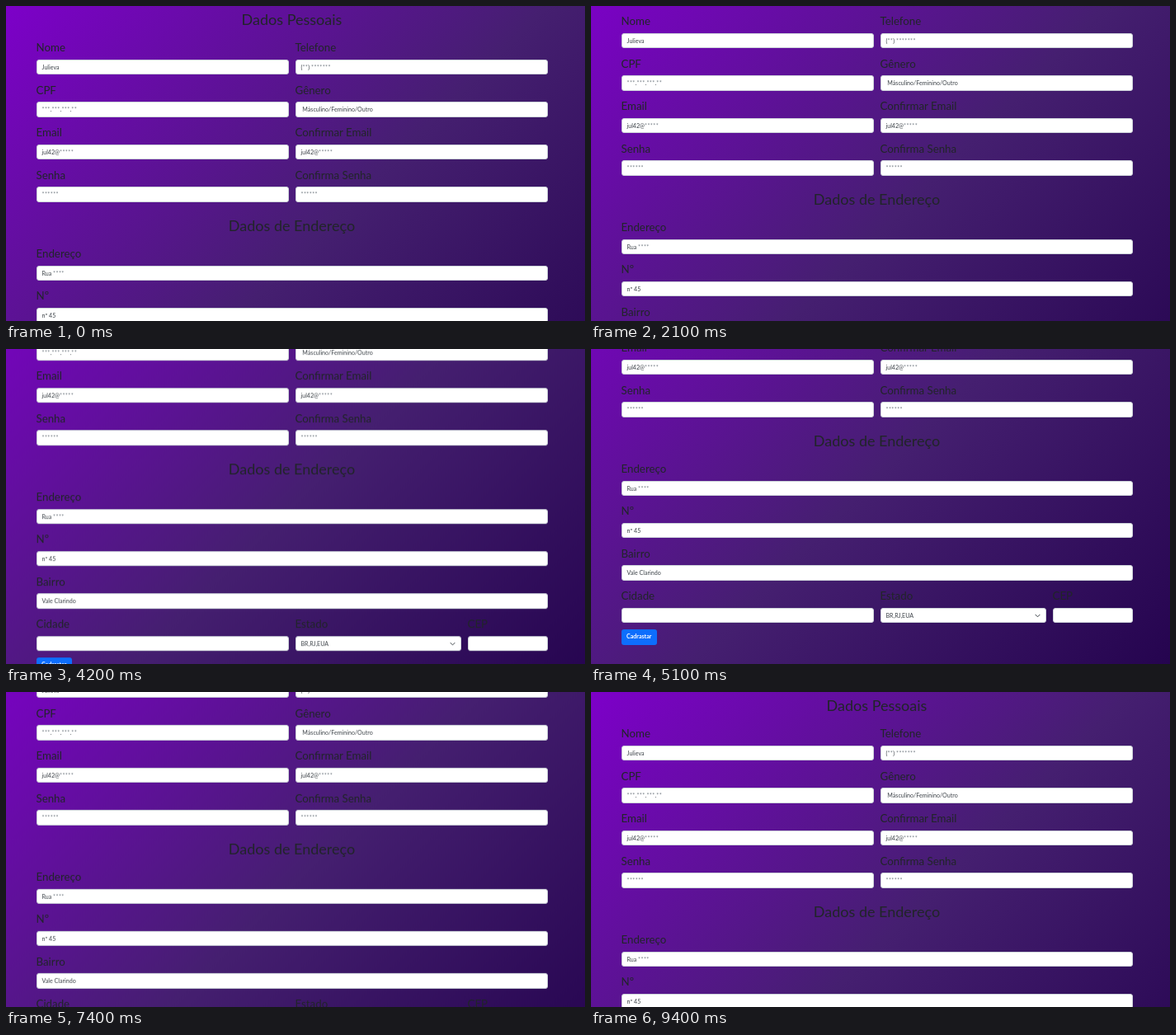
These frames come from a looping animation (702 by 382 pixels, 10 s). An HTML page:

```html
<!DOCTYPE html>
<html lang="pt-BR">
<head>
<meta charset="utf-8">
<title>Cadastro</title>
<style>
  html, body { margin: 0; width: 100%; height: 100%; overflow: hidden; background: #25044f; }
  body { position: relative; font-family: Lato, "Open Sans", sans-serif; color: #212529; }
  #page {
    position: absolute; left: 0; top: 0; width: 702px; height: 537px;
    background: linear-gradient(135deg, #7d00c9 0%, #451f70 53%, #25044f 100%);
    will-change: transform;
  }
  #page > * { position: absolute; box-sizing: border-box; margin: 0; white-space: pre; }
  h1 { left: 0; width: 693px; height: 26px; text-align: center; font: 400 18px/26px Lato, "Open Sans", sans-serif; }
  label { height: 18px; font-size: 13.3px; line-height: 18px; }
  .field {
    height: 18.6px; padding-left: 6px; border: .5px solid #ced4da; border-radius: 3px;
    background: #fff; color: #3c4248; font-size: 7.1px; line-height: 17.6px;
  }
  .field i { font-style: normal; letter-spacing: .4px; color: #6c757d; }
  .field svg { position: absolute; right: 6px; top: 5.5px; width: 7px; height: 7px; }
  .button {
    left: 36.5px; top: 495px; width: 43.5px; height: 18.6px; border-radius: 3px;
    background: #0d6efd; color: #fff; text-align: center; font-size: 7.1px; font-weight: 700; line-height: 18.6px;
  }
</style>
</head>
<body>
<div id="page"></div>
<script>
const page = document.getElementById('page');
const LEFT = 36.5, RIGHT = 350.5, HALF = 306, FULL = 620;
const LOOP = 10000, STEP = 100, BOTTOM = 155;

function add(tag, html, style, cls = '') {
  const el = document.createElement(tag);
  el.className = cls;
  el.innerHTML = html;
  for (const k in style) el.style[k] = style[k] + 'px';
  page.append(el);
}

const title = (text, y) => add('h1', text, { top: y - 13 });

// y is the vertical centre of the input
function field(name, value, x, y, width, extra = '') {
  const text = value.replace(/\*+/g, '<i>$&</i>');
  add('label', name, { left: x, top: y - 32.8 });
  add('div', text + extra, { left: x, top: y - 9.3, width }, 'field');
}

const chevron = '<svg viewBox="0 0 16 16"><path d="M2 5l6 6 6-6" fill="none" stroke="#343a40" ' +
  'stroke-width="2.2" stroke-linecap="round" stroke-linejoin="round"/></svg>';

title('Dados Pessoais', 16);
[
  ['Nome', 'Julieva', 'Telefone', '(**) *******'],
  ['CPF', '***.***.***.**', 'Gênero', ' Másculino/Feminino/Outro'],
  ['Email', 'jul42@*****', 'Confirmar Email', 'jul42@*****'],
  ['Senha', '******', 'Confirma Senha', '******']
].forEach(([a, b, c, d], i) => {
  const y = 74.2 + i * 51.4;
  field(a, b, LEFT, y, HALF);
  field(c, d, RIGHT, y, HALF);
});

title('Dados de Endereço', 266);
[['Endereço', 'Rua ****'], ['Nº', 'nº 45'], ['Bairro', 'Vale Clarindo']]
  .forEach(([name, value], i) => field(name, value, LEFT, 323.8 + i * 51.4, FULL));
field('Cidade', '', LEFT, 478, HALF);
field('Estado', 'BR,RJ,EUA', RIGHT, 478, 201.5, chevron);
field('CEP', '', 559.5, 478, 97);
add('div', 'Cadrastar', {}, 'button');

// Slow scroll down, rest, quicker eased scroll back to the top
function scrollAt(t) {
  if (t < 1150) return 0;
  if (t < 2100) return 32 * ((t - 1150) / 950) ** 1.25;
  if (t < 4700) return 32 + (t - 2100) * 0.0423;
  if (t < 5100) return BOTTOM - 13 * ((5100 - t) / 400) ** 1.3;
  const k = Math.min(1, Math.max(0, (t - 6370) / 2037));
  return BOTTOM * (1 + Math.cos(Math.PI * k)) / 2;
}

function draw() {
  const t = Math.floor((performance.now() % LOOP) / STEP) * STEP;
  page.style.transform = `translateY(${-scrollAt(t).toFixed(2)}px)`;
  requestAnimationFrame(draw);
}
draw();
</script>
</body>
</html>
```
